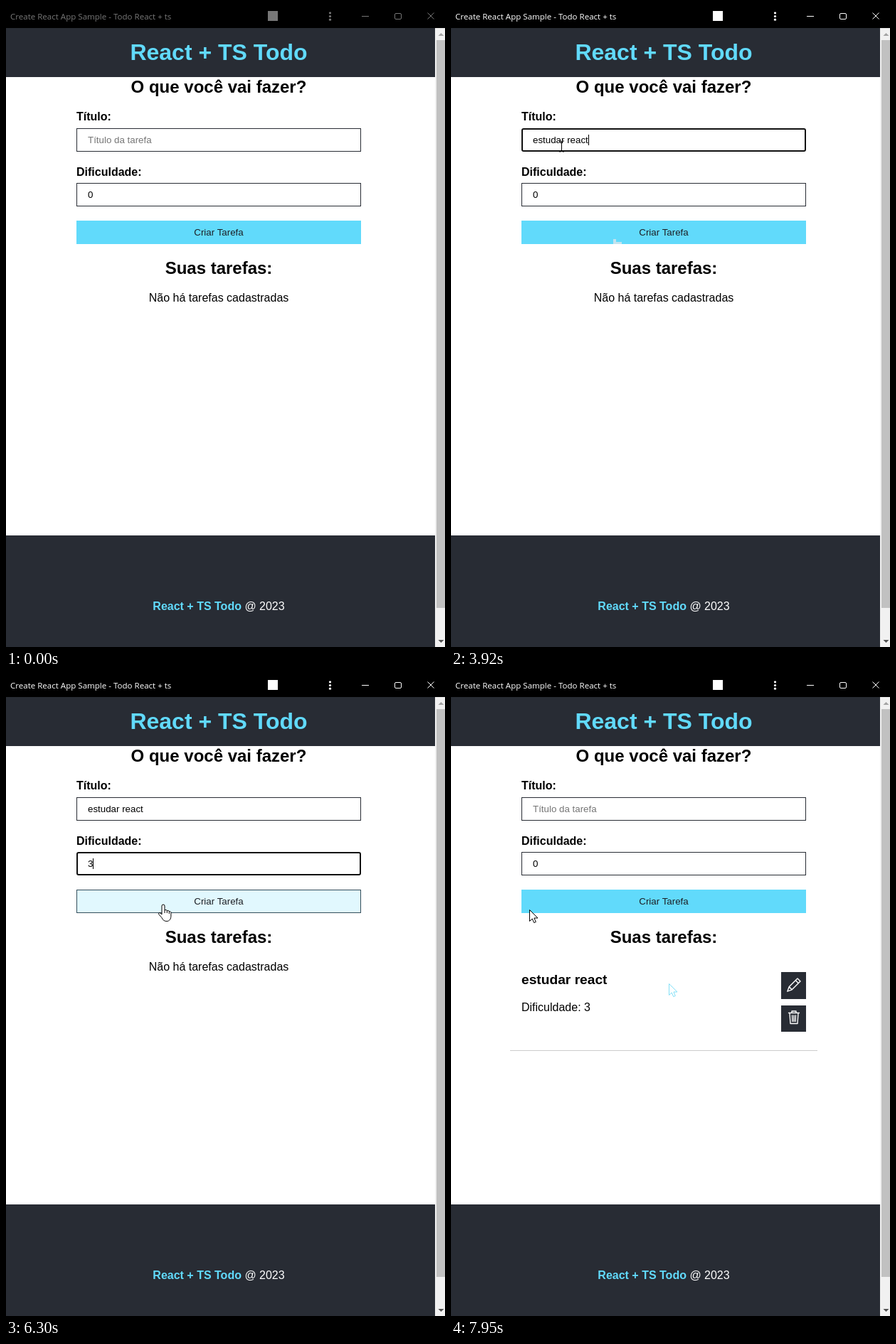
An HTML page for the animation above (8000 ms loop, 617 by 902 pixels).

```html
<!DOCTYPE html>
<html lang="pt">
<head>
<meta charset="utf-8">
<title>React + TS Todo</title>
<style>
  html, body { margin: 0; width: 100%; height: 100%; overflow: hidden; background: #fff; }
  svg { display: block; width: 617px; height: 902px; }
  text { font: 16px "Liberation Sans", Arial, sans-serif; white-space: pre; }
  .bold { font-weight: bold; }
  .mid { text-anchor: middle; }
  .h1 { font-size: 32px; font-weight: bold; fill: #61dafb; }
  .h2 { font-size: 24px; font-weight: bold; }
  .h3 { font-size: 19.2px; font-weight: bold; }
  .field { font-size: 13.333px; }
  .bar { font: 11.56px "Open Sans", "Noto Sans", sans-serif; }
  .dark { fill: #282c34; }
  .icon { fill: none; stroke: #fff; stroke-width: 1.4; stroke-linejoin: round; stroke-linecap: round; }
</style>
</head>
<body>
<svg viewBox="0 0 617 902">
  <defs>
    <path id="arrowShape" d="M.5.5V16.500L4.200 13l2.500 5.600 2.600-1.100-2.400-5.500h5.100z"/>
  </defs>
  <rect width="617" height="902" fill="#fff"/>
  <rect width="617" height="31"/>
  <g id="chrome">
    <text class="bar" x="6" y="19">Create React App Sample - Todo React + ts</text>
    <rect x="368" y="7" width="14" height="14"/>
    <circle cx="455.500" cy="9.800" r="1.600"/>
    <circle cx="455.500" cy="14.500" r="1.600"/>
    <circle cx="455.500" cy="19.200" r="1.600"/>
    <path fill="none" stroke="currentColor" d="M500 14.500h10M592.500 9.500l9 9m0-9l-9 9"/>
    <rect x="546.500" y="10.500" width="9" height="8" rx="1.500" fill="none" stroke="currentColor"/>
  </g>

  <rect class="dark" y="31" width="603" height="69"/>
  <text class="h1 mid" x="299" y="76">React + TS Todo</text>
  <text class="h2 mid" x="299" y="122">O que você vai fazer?</text>
  <text class="bold" x="99" y="161">Título:</text>
  <text class="bold" x="99" y="239">Dificuldade:</text>
  <rect id="box1" fill="#fff"/>
  <rect id="box2" fill="#fff"/>
  <rect id="selection" x="115" y="258" width="7" height="15" fill="#3664c0"/>
  <text id="value1" class="field" x="115" y="193"></text>
  <text id="value2" class="field" x="115" y="270"></text>
  <rect id="caret" width="1" height="15"/>
  <rect id="button" x="99.500" y="302.500" width="399" height="32"/>
  <path id="smudge" d="M228 328h4v4h8v3h-12z" fill="#c3e3ee"/>
  <text class="field mid" x="299" y="323" fill="#1c1f25">Criar Tarefa</text>
  <text class="h2 mid" x="299" y="377">Suas tarefas:</text>

  <text id="empty" class="mid" x="299" y="416">Não há tarefas cadastradas</text>
  <g id="task">
    <text class="h3" x="99" y="435">estudar react</text>
    <text x="99" y="473">Dificuldade: 3</text>
    <path class="dark" d="M464 418h35v38h-35zM464 465h35v37h-35z"/>
    <path class="icon" d="M472.800 445.200l2.400-6.400L487 427l4 4-11.800 11.800zM484.300 429.700l4 4M475.200 438.800l4 4"/>
    <path class="icon" d="M474.500 475.500h15M479 475v-2h6v2M476 476l1 14.500h10l1-14.500M479.500 479l.4 8.500M482 479v8.500M484.500 479l-.4 8.500"/>
    <path d="M83 528.500h432" stroke="#ccc"/>
  </g>

  <rect class="dark" y="745" width="603" height="157"/>
  <text class="mid" x="299" y="850" fill="#fff"><tspan class="bold" fill="#61dafb">React + TS Todo</tspan> @ 2023</text>
  <rect x="603" y="31" width="14" height="871" fill="#f1f1f1"/>
  <rect x="605" y="48" width="12" height="799" fill="#c1c1c1"/>
  <path d="M607.500 42l4-4 4 4z" fill="#a3a3a3"/>
  <path d="M607.500 892l4 4 4-4z" fill="#505050"/>

  <use id="trail" href="#arrowShape" x="306" y="434" fill="#fff" stroke="#83e0f7"/>
  <g id="cursor">
    <use id="arrow" href="#arrowShape" fill="#fff" stroke="#000"/>
    <path id="beam" d="M-3.500-7.500h2.500l1 1 1-1h2.500M0-6.500v13M-3.500 7.500h2.500l1-1 1 1h2.500" transform="translate(.5 .5)" fill="none" stroke="#000"/>
    <path id="hand" d="M-2 2a2 2 0 0 1 4 0v6c1-1 3-.6 3.300.8 1-.8 2.800-.4 3 1 1.200-.6 2.600.1 2.600 1.600V16c0 4-2 7.500-6 7.500s-5.500-2-7-5L-6.500 13.500C-7 12-4.500 10.500-3 13l1 1zM2 8v4M5.300 9v3M8.300 10v3" fill="#fff" stroke="#000"/>
  </g>
</svg>
<script>
const LOOP = 8000;
const STEP = 67;
const $ = id => document.getElementById(id);
const show = (id, on) => $(id).setAttribute('visibility', on ? 'visible' : 'hidden');
const set = (id, attrs) => {
  for (const name in attrs) $(id).setAttribute(name, attrs[name]);
};

const FOCUS_TITLE = 870, FOCUS_LEVEL = 4330, SELECT = 4460, TYPE_LEVEL = 6030;
const PRESS = 6500, SUBMIT = 6566, HOVER = 6045, LEAVE = 7098;
const TITLE = 'estudar react';
const KEYS = [1730, 1860, 1990, 2120, 2190, 2320, 2520, 2650, 2850, 2920, 2990, 3190, 3520];

// The pointer is sampled at a fixed step within each of these runs.
const RUNS = [0, 70, 670, 3920, 4730, 5560, 6030, 7050, 7880];

// time, x, y, shape (a: arrow, b: beam, h: hand)
const PATH = [
  [70, 522, 799, 'a'], [137, 478, 690, 'a'], [204, 405, 545, 'a'], [271, 310, 420, 'a'],
  [338, 235, 325, 'h'], [405, 178, 225, 'a'], [470, 161, 173, 'b'], [669, 161, 173, 'b'],
  [670, 156, 178, 'b'], [737, 151, 183, 'b'], [3919, 151, 183, 'b'],
  [3920, 155, 197, 'b'], [3987, 154, 215, 'a'], [4054, 146, 238, 'a'], [4121, 135, 256, 'b'],
  [4255, 126, 265, 'b'], [4389, 125, 265, 'b'], [4523, 100, 265, 'b'], [4657, 77, 265, 'b'],
  [4930, 77, 263, 'b'], [5200, 96, 268, 'b'], [5467, 137, 283, 'b'], [5559, 137, 283, 'b'],
  [5560, 148, 287, 'a'], [5627, 156, 290, 'a'], [6029, 156, 290, 'a'],
  [6030, 162, 297, 'a'], [6097, 178, 307, 'h'], [6231, 213, 321, 'h'], [6298, 221, 323, 'h'],
  [7049, 221, 323, 'h'], [7050, 236, 330, 'h'], [7117, 306, 433, 'a'], [7184, 284, 490, 'a'],
  [7251, 238, 530, 'a'], [7318, 204, 540, 'a'], [7452, 201, 530, 'a'], [7787, 180, 444, 'a'],
  [7879, 180, 444, 'a'], [7880, 134, 414, 'b'], [7947, 110, 330, 'a'], [LOOP, 110, 330, 'a']
];

function sampled(t) {
  const start = RUNS.filter(r => r <= t).pop();
  return start + Math.floor((t - start) / STEP) * STEP;
}

function pointer(t) {
  const i = PATH.findIndex((p, n) => n + 1 === PATH.length || PATH[n + 1][0] > t);
  const a = PATH[i], b = PATH[i + 1] || a;
  const k = b === a ? 0 : Math.max(0, (t - a[0]) / (b[0] - a[0]));
  return { x: Math.round(a[1] + (b[1] - a[1]) * k), y: Math.round(a[2] + (b[2] - a[2]) * k), shape: a[3] };
}

// The CSS "ease" curve.
function ease(x) {
  if (x <= 0) return 0;
  if (x >= 1) return 1;
  const curve = (u, p, q) => 3 * p * u * (1 - u) ** 2 + 3 * q * u * u * (1 - u) + u ** 3;
  let lo = 0, hi = 1;
  for (let i = 0; i < 20; i++) {
    const u = (lo + hi) / 2;
    if (curve(u, 0.25, 0.25) < x) lo = u; else hi = u;
  }
  return curve(lo, 0.1, 1);
}

const CYAN = [97, 218, 251], WHITE = [255, 255, 255], DARK = [40, 44, 52];
const mix = (a, b, k) => `rgb(${a.map((v, i) => Math.round(v + (b[i] - v) * k))})`;

function drawBox(id, y, focused) {
  const inset = focused ? 1 : 0.5;
  set(id, {
    x: 99 + inset, y: y + inset, width: 400 - 2 * inset, height: 33 - 2 * inset,
    rx: focused ? 2 : 0, stroke: focused ? '#101010' : '#282c34', 'stroke-width': 2 * inset
  });
}

function drawCaret(t, onTitle, onLevel) {
  const edits = [FOCUS_TITLE, ...KEYS, TYPE_LEVEL].filter(e => e <= t);
  const lit = Math.floor((t - edits.pop()) / 530) % 2 === 0;
  const typed = onLevel ? $('value2') : $('value1');
  const empty = onTitle && t < KEYS[0];
  const x = 115 + (empty ? 0 : Math.round(typed.getComputedTextLength()));
  set('caret', { x, y: onLevel ? 258 : 181 });
  show('caret', lit && (onTitle || (onLevel && t >= TYPE_LEVEL)));
}

function render(t) {
  const active = t >= FOCUS_TITLE;
  const tone = active ? '#fff' : '#777';
  set('chrome', { fill: tone, color: tone });

  const onTitle = active && t < FOCUS_LEVEL;
  const onLevel = t >= FOCUS_LEVEL && t < PRESS;
  const done = t >= SUBMIT;
  drawBox('box1', 172, onTitle);
  drawBox('box2', 249, onLevel);

  const title = done ? '' : TITLE.slice(0, KEYS.filter(k => k <= t).length);
  $('value1').textContent = title || 'Título da tarefa';
  set('value1', { fill: title ? '#000' : '#757575' });
  const selected = t >= SELECT && t < TYPE_LEVEL;
  $('value2').textContent = t >= TYPE_LEVEL && !done ? '3' : '0';
  set('value2', { fill: selected ? '#fff' : '#000' });
  show('selection', selected);
  drawCaret(t, onTitle, onLevel);

  const s = sampled(t);
  const hover = s < LEAVE ? ease((s - HOVER) / 500) : 1 - ease((s - LEAVE) / 500);
  set('button', { fill: mix(CYAN, WHITE, hover), stroke: mix(CYAN, DARK, hover) });
  show('smudge', t >= 405 && t < HOVER);
  show('trail', t >= 7184);
  show('empty', !done);
  show('task', done);

  const p = pointer(s);
  const visible = t >= 70;
  set('cursor', { transform: `translate(${p.x} ${p.y})` });
  show('arrow', visible && p.shape === 'a');
  show('beam', visible && p.shape === 'b');
  show('hand', visible && p.shape === 'h');
}

function tick() {
  render(performance.now() % LOOP);
  requestAnimationFrame(tick);
}
tick();
</script>
</body>
</html>
```
